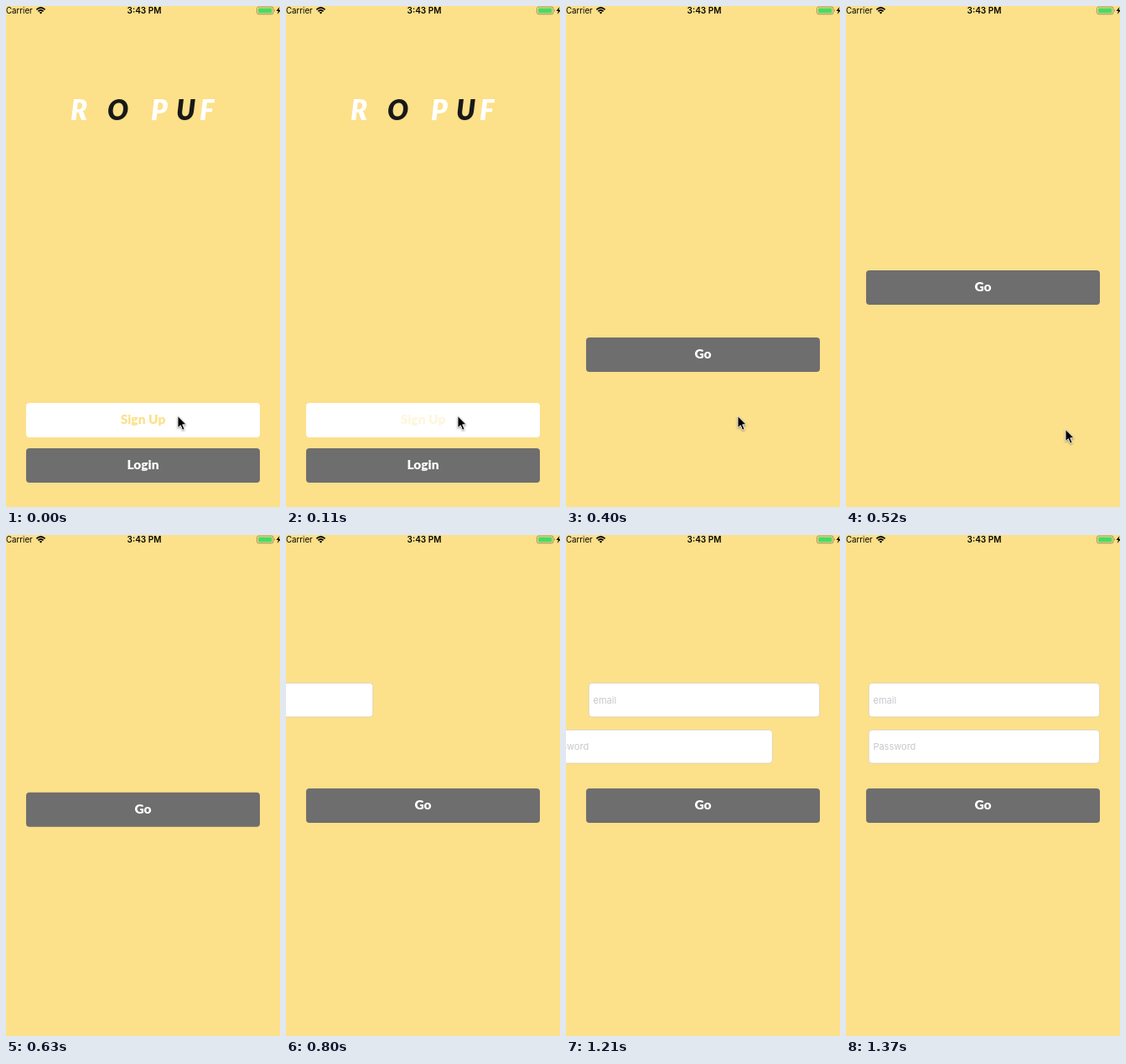
An HTML page that plays this animation: 327 by 597 pixels, repeating every 4.37 s.

```html
<!DOCTYPE html>
<html lang="en">
<head>
<meta charset="utf-8">
<style>
  html, body { margin: 0; height: 100%; overflow: hidden; background: #fce08a; }
  svg { display: block; width: 327px; height: 597px; }
  text { font-family: Inter, "Liberation Sans", sans-serif; }
  .btn { font: 900 15.5px Lato, sans-serif; text-anchor: middle; fill: #fff; }
  .title text { font: italic 900 33px Lato, sans-serif; }
  .field rect { fill: #fff; stroke: #d3cdb8; stroke-width: .7; }
  .field text { font-size: 11px; fill: #c7c7cd; }
  .gray { fill: #6e6e6e; }
</style>
</head>
<body>
<svg viewBox="0 0 327 597">
  <rect width="327" height="597" fill="#fce08a"/>

  <text x="0" y="9" font-size="9.7">Carrier</text>
  <g fill="none" stroke="#000" stroke-width="1.7">
    <path d="M36.4 4.3Q41.5 -.3 46.6 4.3M38.4 6.4Q41.5 3.6 44.6 6.4"/>
    <path d="M41.5 9.6L39.7 7.7Q41.5 6.3 43.3 7.7Z" fill="#000" stroke="none"/>
  </g>
  <text x="165" y="9" font-size="10" font-weight="600" text-anchor="middle">3:43 PM</text>
  <rect x="299.5" y="1" width="19.5" height="8.8" rx="2.2" fill="none" stroke="#8d8055" stroke-width=".8"/>
  <rect x="301" y="2.4" width="16.5" height="6" rx="1" fill="#4cd964"/>
  <path d="M320 3.8Q321.6 5.4 320 7Z" fill="#8d8055"/>
  <path d="M326.5 1L322.5 6H325L323.8 10L328 4.8H325.5Z"/>

  <g id="title" class="title"></g>

  <g id="home">
    <rect x="24" y="473" width="279" height="41" rx="4" fill="#fff"/>
    <text id="signUp" class="btn" x="163.5" y="498" style="fill:#fce08a">Sign Up</text>
    <rect class="gray" x="24" y="527" width="279" height="41" rx="4"/>
    <text class="btn" x="163.5" y="552">Login</text>
  </g>

  <g id="email" class="field">
    <rect x="27.3" y="176.5" width="275.3" height="40.3" rx="4"/>
    <text x="32.5" y="200.5">email</text>
  </g>
  <g id="password" class="field">
    <rect x="27.3" y="232.3" width="275.3" height="39.7" rx="4"/>
    <text x="32.5" y="256">Password</text>
  </g>
  <g id="go">
    <rect class="gray" x="24" width="279" height="41" rx="4"/>
    <text class="btn" x="163.5" y="25">Go</text>
  </g>

  <path id="cursor" d="M0 0V14.2L3.3 11.2L5.7 16.8L8.1 15.8L5.7 10.3H10.2Z" stroke="#fff" stroke-width=".9"
        style="filter:drop-shadow(0 1px 1px #0006)"/>
</svg>
<script>
const LOOP = 4370;
const TICKS = [0, 110, 290, 340, 400, 460, 520, 580, 640, 690, 740, 800,
               860, 920, 970, 1030, 1090, 1140, 1200, 1260, 1310, 1370];
const el = id => document.getElementById(id);
const move = (id, x, y) => el(id).setAttribute('transform', `translate(${x} ${y})`);
const show = (id, on) => el(id).style.display = on ? '' : 'none';
const clamp = v => Math.min(1, Math.max(0, v));
const smooth = p => p * p * (3 - 2 * p);

const letters = [['R', 77], ['O', 121], ['P', 173], ['U', 203], ['F', 231]];
el('title').innerHTML = letters.map(([c, x], i) =>
  `<text x="${x}" y="136" fill="${i % 2 ? '#181818' : '#fff'}">${c}</text>`).join('');

// Fields enter from one stage width to the left
const slide = (id, t, start) => move(id, -327 * (1 - smooth(clamp((t - start) / 667))), 0);

function draw(t) {
  show('home', t < 290);
  el('signUp').style.opacity = t < 110 ? 1 : .3;
  show('title', t < 340);

  show('go', t >= 340);
  move('go', 0, 302 + 225 * Math.exp(-Math.pow(.01484 * Math.max(0, t - 340), 1.064)));

  slide('email', t, 515);
  slide('password', t, 709);

  const p = clamp((t - 400) / 120) ** 1.5;
  show('cursor', t < 580);
  move('cursor', 205 + 57 * p, 488.5 + 16 * p);
}

const begin = performance.now();
function frame() {
  const t = (performance.now() - begin) % LOOP;
  draw(TICKS.findLast(k => k <= t) ?? 0);
  requestAnimationFrame(frame);
}
frame();
</script>
</body>
</html>
```
